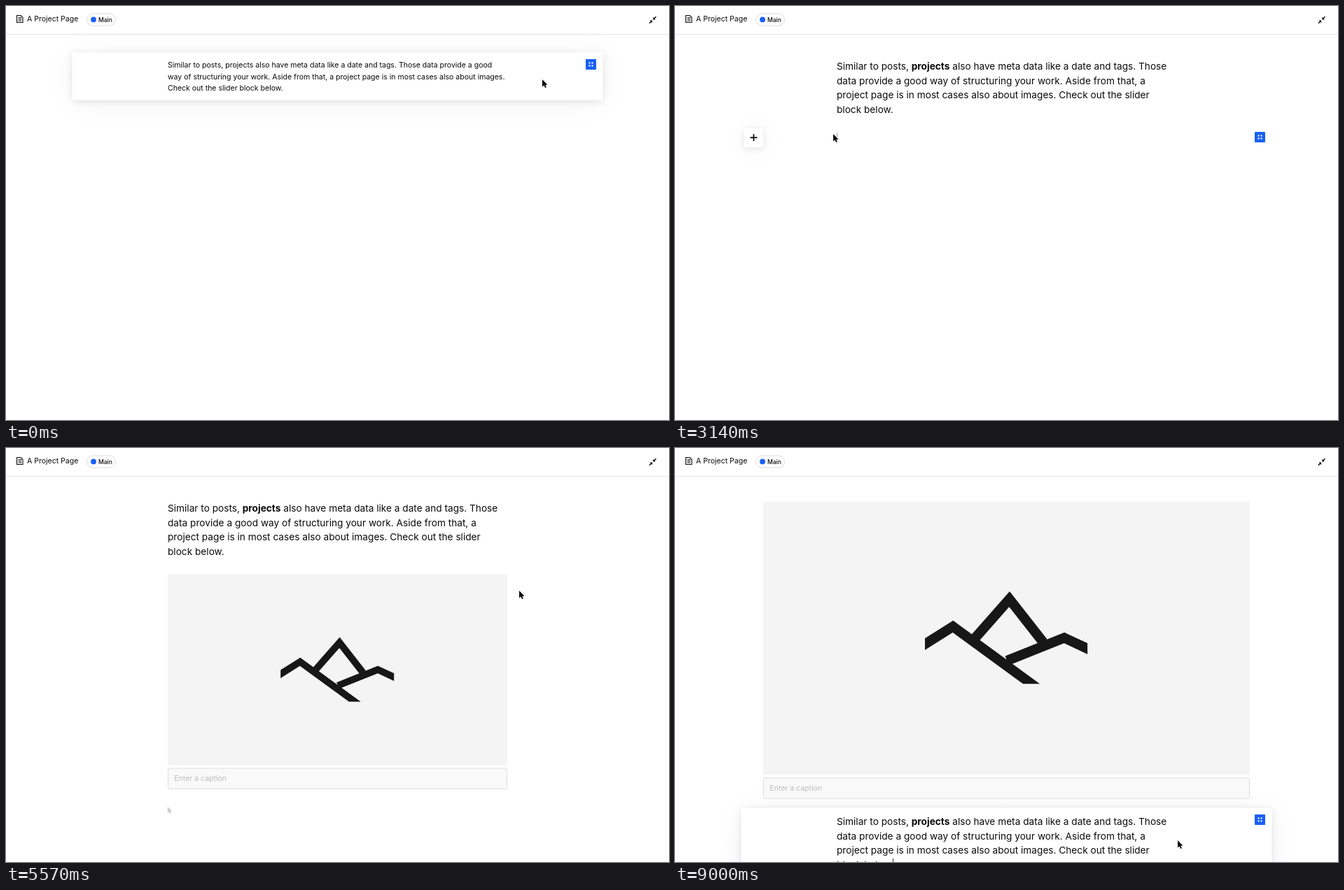
Recreate the animation shown at these times as an HTML page with a canvas. Size 947 by 592 pixels, loop 9.14 s.

```html
<!DOCTYPE html>
<html lang="en">
<head>
<meta charset="utf-8">
<title>Block editor</title>
<style>
html, body { margin: 0; width: 100%; height: 100%; overflow: hidden; background: #fff; }
canvas { display: block; width: 947px; height: 592px; }
</style>
</head>
<body>
<canvas id="stage"></canvas>
<script>
const W = 947, H = 592, LOOP = 9140, STEP = 1000 / 7, LAST = 63;
const REM = 16 * W / 1440, LARGE = REM * 1.3, LEADING = LARGE * 1.495;
const LEFT = 231, MID = 473.5;
const BLUE = '#1a60f6', INK = '#0a0a0a', PALE = '#bcbcbc', LINE = '#dedede';

// Step at which each thing happens
const AT = {
  hover: 3, menu: 4, enlarge: 6, select: 9, tools: 10, bold: 13, deselect: 17,
  newBlock: 20, toolbox: 25, placeholder: 28, modal: 29, insert: 33, focus: 43,
  tip: 44, tune: 47, swap: 51, retune: 54, stretch: 57, leave: 59
};

// Cursor stops: arrival step, x, y
const STOPS = [
  [0, 766, 105], [AT.hover, 834, 82], [AT.menu + 1, 802, 108], [AT.enlarge + 2, 392, 86],
  [AT.bold - 1, 345, 114], [22, 226, 183], [AT.toolbox - 1, 111, 186], [AT.placeholder - 1, 166, 245],
  [31, 430, 311], [39, 733, 204], [AT.tip, 834, 185], [49, 774, 160],
  [AT.swap, 651, 98], [AT.retune - 1, 834, 82], [AT.stretch - 1, 802, 110], [LAST, 718, 561]
];
const TRAVEL = 3;

const ARROW = new Path2D('M0 0V10.6L2.4 8.4 4.1 12.1 5.9 11.3 4.3 7.8H7.6Z');
const HAND = new Path2D('M0 1Q1-.5 2 1L3 5 9 6V9L7.6 14H2.4L-2 9 1 8.5Z');

const canvas = document.getElementById('stage');
const ctx = canvas.getContext('2d');
const ratio = window.devicePixelRatio || 1;
canvas.width = W * ratio;
canvas.height = H * ratio;

let step = 0;
const during = (from, to) => step >= from && step < to;
const clamp = v => Math.max(0, Math.min(1, v));
const ease = v => v * v * (3 - 2 * v);

function at(x, y, scale, paint) {
  ctx.save();
  ctx.translate(x, y);
  ctx.scale(scale, scale);
  paint();
  ctx.restore();
}

function text(s, x, y, { size = REM, color = INK, weight = 400, align = 'left' } = {}) {
  ctx.font = `${weight} ${size}px Inter, sans-serif`;
  ctx.textAlign = align;
  ctx.fillStyle = color;
  ctx.fillText(s, x, y);
}

// Sets words one by one, so that no kerning reaches across spaces
function sentence(s, x, y, size, boldWord) {
  ctx.font = `400 ${size}px Inter, sans-serif`;
  const space = ctx.measureText(' ').width;
  for (const word of s.split(' ')) {
    text(word, x, y, { size, weight: word === boldWord ? 700 : 400 });
    x += ctx.measureText(word).width + space;
  }
}

function box(x, y, w, h, fill, stroke, r = 0, lw = 1) {
  ctx.beginPath();
  ctx.roundRect(x, y, w, h, r);
  if (fill) { ctx.fillStyle = fill; ctx.fill(); }
  if (stroke) { ctx.strokeStyle = stroke; ctx.lineWidth = lw; ctx.stroke(); }
}

function line(points, lw = 1.8, color = INK, close = false) {
  ctx.beginPath();
  points.forEach(p => ctx.lineTo(...p));
  if (close) ctx.closePath();
  ctx.strokeStyle = color;
  ctx.lineWidth = lw;
  ctx.stroke();
}

function disc(x, y, r, color) {
  ctx.beginPath();
  ctx.arc(x, y, r, 0, 7);
  ctx.fillStyle = color;
  ctx.fill();
}

function shadow(blur, dy, color) {
  ctx.shadowColor = color;
  ctx.shadowBlur = blur * ratio;
  ctx.shadowOffsetY = dy * ratio;
}

function raised(x, y, w, h, alpha = 1, r = 1) {
  ctx.save();
  ctx.globalAlpha *= alpha;
  shadow(44, 3, 'rgba(0,0,0,.05)');
  box(x, y, w, h, '#fff', null, r);
  shadow(11, 2, 'rgba(0,0,0,.1)');
  box(x, y, w, h, '#fff', null, r);
  ctx.restore();
}

function cross(x, y, r, lw, color) {
  for (const s of [-1, 1]) line([[x - r, y - r * s], [x + r, y + r * s]], lw, color);
}

function arrow(x, y, angle, color = INK, r = 5) {
  at(x, y, 1, () => {
    ctx.rotate(angle);
    line([[0, r], [0, -r]], 1.8, color);
    line([[.6 - r, -.6], [0, -r], [r - .6, -.6]], 1.8, color);
  });
}

function header() {
  box(0, 40, W, 1, '#e4e4e4');
  line([[15.5, 13.5], [21, 13.5], [24, 16.5], [24, 23.5], [15.5, 23.5]], 1.1, INK, true);
  for (const y of [16.7, 18.8, 21]) line([[17.5, y], [22.2, y]], 1);
  text('A Project Page', 30, 22);
  box(115.5, 11, 41, 17, '#fff', '#dcdcdc', 8.5);
  disc(125, 19.4, 3.9, BLUE);
  text('Main', 132, 22.6, { size: REM * .81, weight: 500 });
  for (const turn of [0, Math.PI]) at(923.7, 20, 1, () => {
    ctx.rotate(turn);
    ctx.fillStyle = INK;
    ctx.fill(new Path2D('M.6-.6H4.2L.6-4.2Z'));
    line([[2, -2], [4.8, -4.8]], 1.5);
  });
}

function paragraph(dy) {
  if (step < AT.enlarge) {
    ['Similar to posts, projects also have meta data like a date and tags. Those data provide a good',
      'way of structuring your work. Aside from that, a project page is in most cases also about images.',
      'Check out the slider block below.'].forEach((s, i) => sentence(s, LEFT, 88 + i * 16.5, REM));
    return;
  }
  const y = 91.3 + dy;
  if (during(AT.select, AT.deselect)) box(338, y - 14.3, 54, 19, '#b5d5fb');
  ['Similar to posts, projects also have meta data like a date and tags. Those',
    'data provide a good way of structuring your work. Aside from that, a',
    'project page is in most cases also about images. Check out the slider',
    'block below.'].forEach((s, i) =>
    sentence(s, LEFT, y + i * LEADING, LARGE, !i && step >= AT.bold && 'projects'));
  if (step >= AT.swap) box(311, y + 47.7, 1, 17, '#333');
}

// Three strokes, trimmed by the edges of the drawing
function mountain(x, y, scale, color = '#171717') {
  at(x, y, scale, () => {
    ctx.beginPath();
    ctx.rect(-81.3, -50, 162, 95.5);
    ctx.clip();
    line([[-93, 13.3], [-53.4, -11.6], [41, 57.4]], 9.9, color);
    line([[-31, -.5], [2.9, -39], [36.5, 4]], 9.9, color);
    line([[.5, 22.5], [57.5, -.4], [93, 16.2]], 9.9, color);
  });
}

function helmet(x, y) {
  const mirror = half => [...half, ...half.map(([a, b]) => [-a, b]).reverse()];
  at(x, y, 1, () => {
    line(mirror([[-10.5, -4], [-13, -7], [-7.5, -17.5]]).slice(0, 5), 2.4);
    line([[-12, -5.5], [1, -13.5], [11, -2.5], [13, -7]], 2.4);
    line(mirror([[-14, 11.5], [-8, 11.5], [-5, 14.5]]), 2.4);
  });
}

function field(x, y, w, placeholder, stroke = LINE) {
  box(x + .5, y, w - 1, 29.5, '#f9f9f9', stroke, 2);
  text(placeholder, x + 9.3, y + 18, { color: PALE });
}

function imageBlock(top, scale) {
  const w = 485 * scale, h = 272.5 * scale, x = MID - w / 2;
  box(x, top, w, h, '#f4f4f4');
  mountain(MID, top + h / 2, scale);
  field(x, top + h + 4.5, w, 'Enter a caption');
}

function tuneButton(y) {
  box(828, y - 7.5, 15, 15, BLUE, null, 1);
  for (const dx of [-2, 2]) for (const dy of [-2, 2]) disc(835.5 + dx, y + dy, 1.15, '#fff');
}

function tooltip(y) {
  ctx.save();
  shadow(6, 2, 'rgba(0,0,0,.25)');
  box(806, y - 30, 59.5, 17, '#111', null, 1.5);
  ctx.restore();
  at(835.7, y - 13.2, 1, () => ctx.fill(new Path2D('M-4 0H4L0 4Z')));
  text('Click to tune', 835.7, y - 19, { size: REM * .75, color: '#fff', weight: 500, align: 'center' });
}

function menu(top, rows, active) {
  const last = top + 27 * rows + 14.5;
  raised(760, top, 83.5, 27 * rows + 28.5);
  if (active) box(761, top + .8, 81, 26.5, BLUE);
  arrow(774.5, last, 0);
  cross(801.5, last, 3.9, 1.9);
  arrow(828.5, last, Math.PI);
  return active ? '#fff' : INK;
}

function textMenu() {
  const color = menu(96, 1, step >= AT.enlarge);
  text('A', 792.5, 114.2, { size: 12, color, weight: 600 });
  arrow(806.5, 110, 0, color, 4.3);
}

function imageMenu(top) {
  const color = menu(top, 4, step >= AT.stretch);
  arrow(798, top + 14, -Math.PI / 2, color);
  arrow(805, top + 14, Math.PI / 2, color);
  ['¼', '⅓', '½', '⅔', '¾', '1'].forEach((s, i) =>
    text(s, 774.5 + i % 3 * 27, top + 45 + Math.floor(i / 3) * 27, { weight: 500, align: 'center' }));
  for (let i = 0; i < 3; i++) box(769.5 + i * 27, top + 90, 10, 8, null, INK, 0, 1.4);
}

function inlineToolbar() {
  raised(242, 101, 246, 27);
  [...'TAHBIUSC#'].forEach((s, i) => {
    const on = s === 'B' && step >= AT.bold;
    text(s, 262 + i * 27, 118.4, { color: on ? BLUE : INK, weight: 600, align: 'center' });
  });
}

function toolbox() {
  raised(99, 207, 108, 108);
  for (let i = 0; i < 16; i++) {
    const x = 112.5 + i % 4 * 27, y = 220.5 + Math.floor(i / 4) * 27;
    if (i % 2) box(x - 4.5, y - 4.5, 9, 9, null, INK, 1, 1.3);
    else for (const dy of [-4, 0, 4]) line([[x - 5, y + dy], [x + 5, y + dy]], 1.3);
  }
}

function newBlockControls() {
  raised(99, 175, 27, 27);
  line([[107.4, 188.2], [117.4, 188.2]]);
  line([[112.4, 183.2], [112.4, 193.2]]);
  box(231, 181, 1, 13, '#999');
}

function modal() {
  ctx.save();
  ctx.globalAlpha = step === AT.modal || step === AT.insert - 1 ? .5 : 1;
  box(0, 0, W, H, 'rgba(0,0,0,.067)');
  raised(276, 33, 395, 382, 1, 3);
  text('Select Image', 287.5, 55);
  cross(653, 51, 2.8, 2, PALE);

  box(606, 82, 53, 29.5, '#fff', '#e6e6e6', 2);
  ctx.save();
  shadow(7, 0, 'rgba(40,110,240,.3)');
  box(288, 82, 318, 29.5, '#fff');
  ctx.restore();
  field(287.5, 82, 319, 'URL', '#4b86e4');
  box(297, 90, 1, 13, '#333');
  for (const d of [-1.7, 1.7]) at(619.5 + d, 96.7 + d, 1, () => {
    ctx.rotate(Math.PI / 4);
    box(-2.7, -1.7, 5.4, 3.4, null, INK, 1.7, 1.3);
  });
  text('Link', 629.7, 100.5, { weight: 500 });
  box(276, 134, 395, 1, '#e4e4e4');

  text('Options', 287.5, 169);
  field(287.5, 184.5, 180.5, 'Width (Pixels)');
  field(479, 184.5, 180.5, 'Height (Pixels)');

  text('General Images', 287.5, 248);
  box(371, 237.5, 17, 13, INK, null, 6.5);
  text('4', 379.5, 247, { size: 8, color: '#fff', weight: 600, align: 'center' });
  for (let i = 0; i < 4; i++) box(287.8 + i * 92.9, 263, 92.9, 92.5, i ? '#f4f4f4' : '#fff', '#dcdcdc');
  disc(334, 309, 28, '#131313');
  mountain(427, 309, .34, '#484848');
  helmet(520.3, 309);
  box(601.7, 298, 22.3, 22.3, null, INK, 0, 2.8);

  box(599.5, 378.5, 59.5, 25.5, '#fff', LINE, 2);
  cross(612.3, 392, 2.8, 2.1);
  text('Close', 622, 395.7, { weight: 500 });
  ctx.restore();
}

function placeholder() {
  box(LEFT, 180.5, 485, 35, '#fff', '#dadada', 3);
  text('Select Image', MID, 201.8, { weight: 500, align: 'center' });
}

function cursorPosition() {
  const i = Math.max(1, STOPS.findIndex(([arrival]) => arrival >= step));
  const [from, x0, y0] = STOPS[i - 1], [to, x1, y1] = STOPS[i];
  const span = Math.min(TRAVEL, to - from);
  const f = ease(clamp(1 - (to - step) / span));
  return [x0 + (x1 - x0) * f, y0 + (y1 - y0) * f];
}

function cursor() {
  const overText = during(AT.enlarge + 2, AT.tools + 1);
  const overControl = during(AT.hover, AT.enlarge + 1) || during(AT.bold - 1, AT.deselect)
    || during(AT.toolbox - 1, AT.insert - 1) || during(AT.tip, AT.swap) || during(AT.retune - 1, AT.leave);
  at(...cursorPosition(), 1, () => {
    ctx.lineJoin = 'round';
    if (overText) {
      for (const [lw, color] of [[2.4, '#fff'], [1.1, '#222']]) {
        line([[0, -6], [0, 7]], lw, color);
        for (const y of [-6, 7]) line([[-3, y], [3, y]], lw, color);
      }
      return;
    }
    const shape = overControl ? HAND : ARROW;
    ctx.lineWidth = 1.8;
    ctx.strokeStyle = overControl ? INK : '#fff';
    ctx.fillStyle = overControl ? '#fff' : INK;
    ctx.stroke(shape);
    ctx.fill(shape);
  });
}

function cards() {
  const card = (y, h, alpha) => raised(94.5, y, 758, h, clamp(alpha));
  if (step < AT.newBlock) card(66.5, step < AT.enlarge ? 68 : 100.5, (AT.newBlock - step) / 4);
  else if (step >= AT.stretch) card(514.8, 100.5, 1);
  else if (step >= AT.focus) card(step < AT.swap ? 170.5 : 66.5, 326, (step - AT.focus + 1) / 2);
}

function draw() {
  ctx.setTransform(ratio, 0, 0, ratio, 0, 0);
  box(0, 0, W, H, '#fff');
  const swapped = step >= AT.swap, stretched = step >= AT.stretch;

  cards();
  header();
  paragraph(stretched ? 448 : swapped ? 330 : 0);
  if (step >= AT.insert) imageBlock(swapped ? 76.7 : 181, stretched ? 1.433 : 1);
  if (during(AT.placeholder, AT.insert)) placeholder();
  if (during(AT.placeholder, AT.stretch)) at(230.8, step < AT.insert ? 241.8 : 513, .87, () => {
    ctx.fillStyle = '#cdcdcd';
    ctx.fill(ARROW);
  });

  if (step < AT.newBlock || during(AT.swap, AT.leave)) tuneButton(83.5);
  if (during(AT.newBlock, AT.placeholder) || during(AT.focus, AT.swap)) tuneButton(187.5);
  if (step >= AT.leave) tuneButton(531.5);

  if (during(AT.newBlock, AT.placeholder)) newBlockControls();
  if (during(AT.toolbox, AT.placeholder)) toolbox();
  if (during(AT.menu, AT.select)) textMenu();
  if (during(AT.tools, AT.deselect)) inlineToolbar();
  if (during(AT.tune, AT.swap)) imageMenu(37);
  if (during(AT.retune, AT.leave)) imageMenu(96);
  if (during(AT.hover, AT.menu)) tooltip(83.5);
  if (during(AT.tip, AT.retune - 1)) tooltip(187);
  if (during(AT.modal, AT.insert)) modal();
  cursor();
}

const start = performance.now();
function tick() {
  const t = (performance.now() - start) % LOOP;
  // The picture advances seven times a second
  step = Math.min(LAST, Math.floor((t + 4.5) / STEP));
  draw();
  requestAnimationFrame(tick);
}
tick();
</script>
</body>
</html>
```
